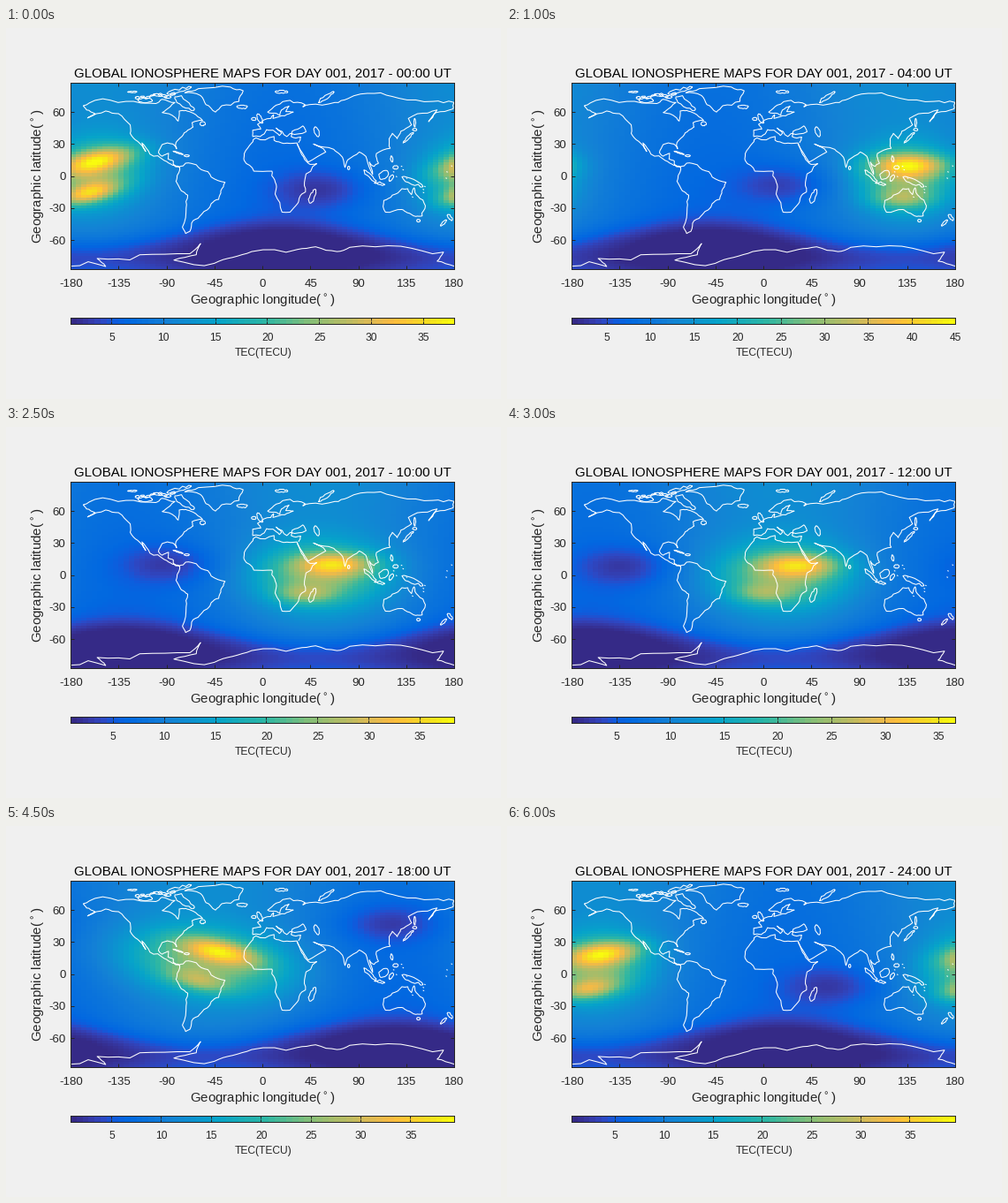
Write a matplotlib script that moves like this. It is 560 by 420 pixels and loops after 6.5 s.

```python
import numpy as np
import matplotlib.pyplot as plt
from matplotlib.animation import FuncAnimation
from matplotlib.collections import LineCollection
from matplotlib.colors import LinearSegmentedColormap

W, H = 560, 420
GREY = "0.15"
LEFT, RIGHT, TOP, BOTTOM = 73, 507, 62, 273
plt.rcParams["font.family"] = "Liberation Sans"

PARULA = LinearSegmentedColormap.from_list("parula_like", [
    (0.00, "#352a87"), (0.05, "#353dad"), (0.08, "#2c4ac7"), (0.11, "#0f5cdd"),
    (0.14, "#0268e1"), (0.25, "#1481d6"), (0.38, "#06a4ca"), (0.51, "#2eb7a4"),
    (0.63, "#87bf77"), (0.78, "#d9ba56"), (0.84, "#f8ba44"), (0.87, "#ffc337"),
    (0.94, "#f5de21"), (1.00, "#f9fb0e")], 256)

# Key points of the coasts: lon, lat, lon, lat, ...
north_america = [
    -168, 66, -157, 71, -128, 70, -100, 68, -94, 72, -82, 69, -87, 64.5,
    -94, 59.5, -82, 55, -79, 51.5, -78, 61, -72, 61.5, -65, 59, -56, 52,
    -66, 50, -65, 46, -70, 43, -75.5, 37, -81, 31.5, -80.5, 25.5, -84, 30,
    -94, 29.5, -97.5, 22, -94, 18.5, -88, 21.3, -88.5, 16, -83.5, 14, -82, 9,
    -78, 8.5, -84, 10, -92, 14.5, -105.5, 20.5, -113, 31, -109.5, 23,
    -117, 32.5, -124, 40, -124, 48, -135, 58.5, -147, 61, -164, 54.5,
    -157, 58.5, -165, 62, -168, 66]
south_america = [
    -78, 8.5, -72, 12, -62, 10.5, -51, 4, -48, -1, -35, -6, -39, -14, -41, -22,
    -48, -26, -57, -36, -65, -42, -68, -52, -72, -54, -75, -48, -71.5, -30,
    -70, -18, -76, -14, -81, -5, -80, 0, -77.5, 6, -78, 8.5]
greenland = [-73, 78, -58, 75.5, -53, 67, -44, 60, -38, 66, -22, 70, -18, 80,
             -30, 83.5, -60, 82, -73, 78]
africa = [
    -6, 35.8, 11, 37, 11, 33.5, 20, 30.5, 32.5, 31, 37, 20, 43, 12, 51, 11.5,
    40, -3, 40.5, -15, 35, -20, 33, -26, 26, -34, 18.5, -34, 12, -17, 13, -8,
    9, 0, 9, 4.5, -8, 4.5, -17, 14.5, -17, 21, -10, 31, -6, 35.8]
asia = [
    32.5, 30, 43, 13, 59.5, 22.5, 48, 30, 67, 25, 73, 20, 77.5, 8, 80, 15,
    91, 22.5, 98, 16, 103.5, 1.5, 100.5, 13, 105, 9, 109, 12, 107, 21, 120, 26,
    119, 35, 122, 40, 126.5, 35, 130, 42, 140, 48, 137, 54, 155, 59, 164, 62,
    156, 51, 163, 59.5, 179, 63, 180, 69, 160, 70, 128, 73, 105, 77.5,
    80, 72.5, 68, 69, 44, 67]
europe = [
    44, 67, 38, 65, 40, 67, 26, 71, 13, 66.5, 5, 60, 11, 59, 16.5, 57, 18, 62,
    25, 65.5, 22, 60.5, 29, 60, 21, 56.5, 10, 54, 10.5, 57.5, 8, 54,
    -4.5, 48.5, -1.5, 44, -9, 43, -9, 37, -2, 37, 4, 43.5, 10, 43, 16, 38,
    18, 40, 13, 45, 23, 37, 26.5, 40, 41, 41.5, 38, 47, 28, 42, 27, 37,
    36, 36.5, 34, 31]
australia = [
    142.5, -11, 146, -19, 153, -28, 150, -37.5, 144, -38, 136, -34.5,
    131, -31.5, 115.5, -34, 114, -23, 122, -18, 131, -12, 136.5, -12,
    140, -17.5, 142.5, -11]
antarctica = [
    -180, -84.7, -147, -85, -155, -77.5, -115, -74, -68, -73, -58, -63.5,
    -62, -74, -83, -79, -45, -82, -28, -76.5, -10, -71, 33, -69, 50, -66.5,
    70, -71, 82, -67, 130, -66, 170, -71.5, 164, -80, 180, -84.7]

# Islands as ellipses: lon, lat, half length, half width, tilt
ISLANDS = [
    (-73, 68, 11, 3, -35), (-78, 80.5, 12, 2, 15), (-110, 71, 7, 2.2, 0),
    (-19, 65, 5, 1.5, 0), (-2.5, 54, 5, 2, 115), (-8, 53.5, 2.2, 1.5, 0),
    (18, 79, 6, 1.5, 0), (60, 74, 9, 1.5, 35), (51, 41.5, 5, 2, 110),
    (137, 36, 7, 1.2, 45), (143, 50, 4, .8, 90), (143, 43.5, 2, 1.2, 0),
    (121.5, 16, 3, 1, 100), (125, 8, 2.5, 1.8, 0), (101, 0, 8, 1.5, -45),
    (110, -7.3, 5, .8, -10), (114, 1, 5, 3.5, 40), (121, -2, 3.5, 1.5, 60),
    (141, -5.5, 11, 2.3, -25), (146.5, -42, 1.7, 1.3, 0), (176, -39, 3.5, 1.5, -50),
    (170, -44, 4, 1, 45), (47, -19, 7, 2.3, 70), (-79, 21.7, 5, .6, -18),
    (-71, 19, 2.5, .8, 0), (-56, 49, 2.5, 2, 0), (81, 7.5, 1.6, 1, 90)]

rng = np.random.default_rng(7)


def roughen(points, rounds=2, amount=0.07):
    """Break every segment at a midpoint pushed sideways at random."""
    for _ in range(rounds):
        step = np.diff(points, axis=0)
        side = step[:, ::-1] * (-1, 1)
        side[np.abs(step).max(axis=1) > 45] = 0
        mid = points[:-1] + step / 2 + side * rng.normal(0, amount, (len(step), 1))
        out = np.empty((len(points) + len(mid), 2))
        out[::2], out[1::2] = points, mid
        points = out
    return points


def ellipse(x, y, a, b, tilt):
    t = np.linspace(0, 2 * np.pi, 11)
    c, s = np.cos(np.radians(tilt)), np.sin(np.radians(tilt))
    u, v = a * np.cos(t), b * np.sin(t)
    return roughen(np.column_stack([x + u * c - v * s, y + u * s + v * c]), 1, 0.15)


def coastlines():
    lands = [north_america, south_america, greenland, africa, asia, europe,
             australia, antarctica]
    lines = [roughen(np.reshape(land, (-1, 2)).astype(float)) for land in lands]
    lines += [ellipse(*island) for island in ISLANDS]
    for lon in np.linspace(-122, -84, 9):
        lines.append(ellipse(lon, rng.uniform(73, 79), rng.uniform(2, 4.5),
                             rng.uniform(.6, 1.3), rng.uniform(-20, 20)))
    for lon, lat in rng.uniform((120, -22), (180, 10), (12, 2)):
        lines.append(np.array([(lon - .6, lat + .3), (lon + .6, lat - .3)]))
    return lines


# Course of the two equatorial crests and the night trough over the day
HOURS = [0, 4, 8, 12, 14, 18, 24]
COURSE = {
    "north_lon": [205, 137, 103, 35, 5, -40, -150],
    "north_lat": [14, 10, 11, 9, 9, 21, 19],
    "north_amp": [.42, .42, .38, .38, .4, .4, .42],
    "south_lon": [197, 130, 80, 0, -23, -60, -165],
    "south_lat": [-16, -21, -18, -17, -17, -6, -14],
    "south_amp": [.42, .2, .24, .18, .28, .22, .32],
    "slope": [.2, 0, 0, 0, -.1, -.2, .12],
    "spread": [32, 30, 42, 44, 46, 54, 34],
    "night_lon": [55, 20, -45, -130, -160, -240, -295],
    "night_lat": [-12, -8, 12, 8, 2, 47, -11],
}
SCALE_HOURS = [0, 4, 8, 12, 14, 16, 18, 24]
LOW = [1.08, .99, .93, .84, .99, .95, .92, .64]
HIGH = [38.0, 45.0, 40.13, 36.56, 35.76, 35.1, 39.4, 39.63]

LON, LAT = np.meshgrid(np.arange(-177.5, 180, 5), np.arange(-86.25, 87, 2.5))


def blob(lon, lat, width, height, slope=0):
    dx = (LON - lon + 180) % 360 - 180
    dy = LAT - lat - slope * dx
    return np.exp(-0.5 * ((dx / width) ** 2 + (dy / height) ** 2))


def tec(hour):
    """Electron content as a share of the colour range."""
    p = {name: np.interp(hour, HOURS, row) for name, row in COURSE.items()}
    mid_lon = (p["north_lon"] + p["south_lon"]) / 2
    mid_lat = (p["north_lat"] + p["south_lat"]) / 2 + 3
    day = np.cos(np.radians(LON - mid_lon))
    edge = -55 + 9 * np.cos(np.radians(LON - mid_lon + 190))
    field = 0.21 + 0.06 * day + 0.03 * LAT / 90
    field -= 0.19 / (1 + np.exp((LAT - edge) / 6))
    field += 0.05 * np.exp(-((LAT + 90) / 9) ** 2)
    field += 0.37 * blob(mid_lon, mid_lat, p["spread"], 21, p["slope"] / 2)
    field += p["north_amp"] * blob(p["north_lon"], p["north_lat"], 25, 7.5, p["slope"])
    field += p["south_amp"] * blob(p["south_lon"], p["south_lat"], 19, 6.5, p["slope"])
    field -= 0.12 * blob(p["night_lon"], p["night_lat"], 32, 13)
    return np.clip(field, 0, 1)


fig = plt.figure(figsize=(W / 100, H / 100), dpi=100, facecolor="#f0f0f0")


def panel(top, bottom, tick):
    ax = fig.add_axes([LEFT / W, 1 - bottom / H, (RIGHT - LEFT) / W, (bottom - top) / H])
    ax.set_axisbelow(False)
    ax.tick_params(direction="in", top=True, right=True, labelbottom=False,
                   labelleft=False, color=GREY, width=0.72, length=tick)
    for spine in ax.spines.values():
        spine.set(color=GREY, linewidth=0.72)
    return ax


def label(x, y, text, px, color=GREY, ha="center", **kw):
    return fig.text(x / W, 1 - y / H, text, fontsize=px * 0.72, color=color,
                    ha=ha, va="baseline", **kw)


def between(share):
    return LEFT + 0.5 + share * (RIGHT - LEFT)


ax = panel(TOP, BOTTOM, 3)
field_im = ax.imshow(tec(0), cmap=PARULA, vmin=0, vmax=1, origin="lower",
                     aspect="auto", interpolation="nearest",
                     extent=(-180, 180, -87.5, 87.5))
ax.add_collection(LineCollection(coastlines(), colors="white", linewidths=0.75))
ax.set(xlim=(-180, 180), ylim=(-87.5, 87.5),
       xticks=range(-180, 181, 45), yticks=range(-60, 61, 30))

center = between(0.5)
for lon in range(-180, 181, 45):
    label(between(lon / 360 + 0.5), 293, str(lon), 13.2)
for lat in range(-60, 61, 30):
    label(67.5, 172.3 - lat * (BOTTOM - TOP) / 175, str(lat), 13.2, ha="right")
label(center, 313, r"Geographic longitude($^\circ$)", 15)
label(41, 167.5, r"Geographic latitude($^\circ$)", 15, rotation=90,
      rotation_mode="anchor")
title = label(center, 56, "", 15, "black")

bar = panel(328, 335, 2.5)
bar.tick_params(left=False, right=False)
bar_im = bar.imshow(np.linspace(0, 1, 64)[None], cmap=PARULA, aspect="auto",
                    interpolation="nearest")
bar.set_yticks([])
bar_labels = {v: label(0, 354, str(v), 12) for v in range(5, 50, 5)}
label(center + 0.5, 371, "TEC(TECU)", 12)


def draw(frame):
    hour = 2 * frame
    low = np.interp(hour, SCALE_HOURS, LOW)
    high = np.interp(hour, SCALE_HOURS, HIGH)
    title.set_text(f"GLOBAL IONOSPHERE MAPS FOR DAY 001, 2017 - {hour:02d}:00 UT")
    field_im.set_data(tec(hour))
    bar_im.set_extent((low, high, 0, 1))
    bar.set_xticks(range(5, int(high) + 1, 5))
    bar.set_xlim(low, high)
    for value, text in bar_labels.items():
        text.set_x(between((value - low) / (high - low)) / W)
        text.set_visible(value <= high)


anim = FuncAnimation(fig, draw, frames=13, interval=500, repeat=True,
                     repeat_delay=0, init_func=lambda: draw(0))
plt.show()
```
